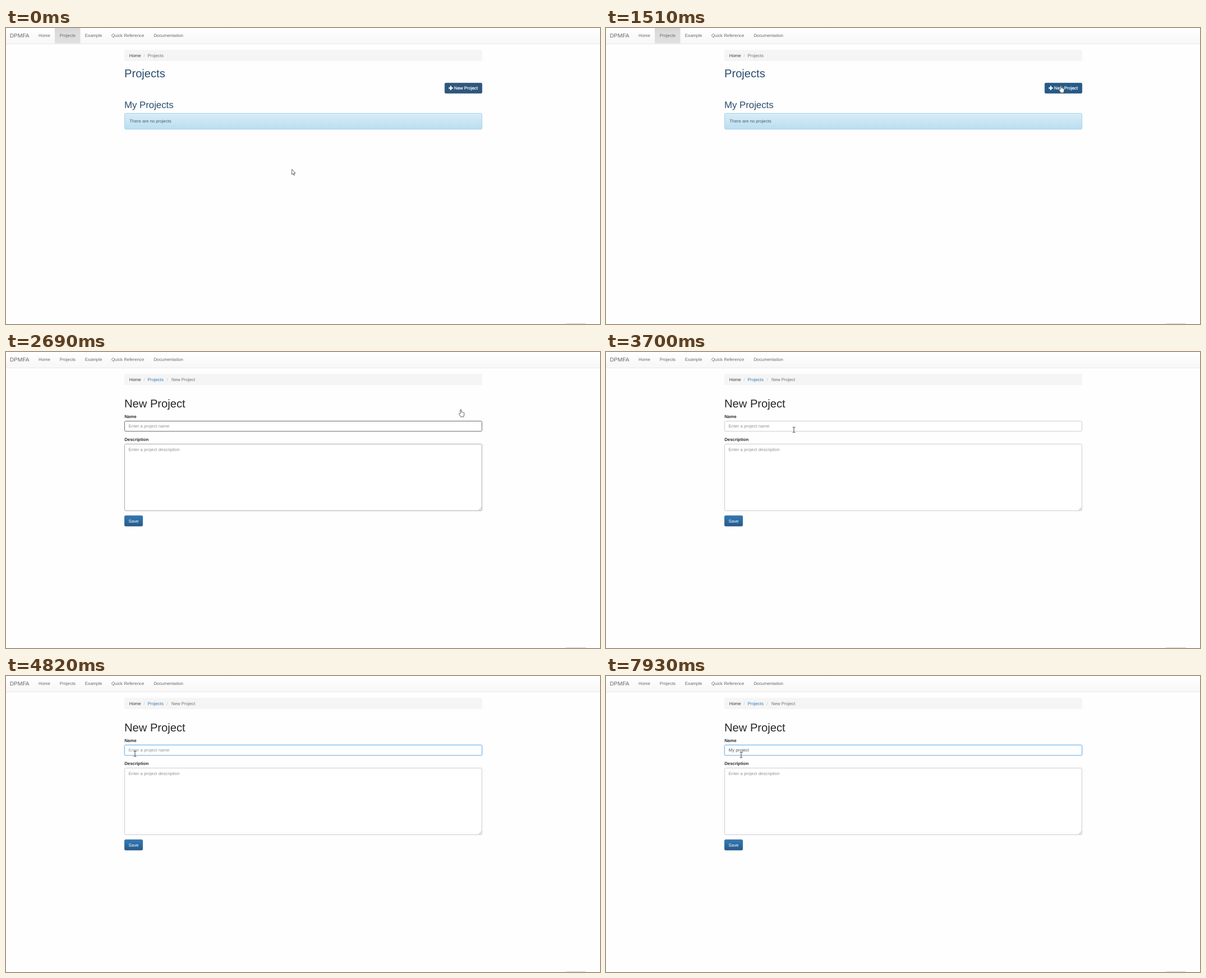
An HTML page for the animation above (8 s loop, 1059 px wide and 529 px high).

```html
<!DOCTYPE html>
<html lang="en">
<head>
<meta charset="utf-8">
<title>New project</title>
<style>
  html, body { margin: 0; width: 100%; height: 100%; overflow: hidden; background: #fefefe; }
  svg { display: block; width: 100%; height: 100%; }
  text { font: 7.83px "Liberation Sans", Arial, sans-serif; text-rendering: geometricPrecision; white-space: pre; }
  .nav { fill: #6a6a6a; }
  .brand { font-size: 10.07px; fill: #666; }
  .dark { fill: #3a3a3a; }
  .muted { fill: #707070; }
  .slash { fill: #c4c4c4; }
  .link { fill: #337ab7; }
  .h1 { font-size: 20.15px; }
  .h2 { font-size: 16.8px; }
  .blue { fill: #2a4b6c; }
  .black { fill: #262626; }
  .label { font-weight: bold; fill: #2b2b2b; }
  .hint { fill: #929292; }
  .white { fill: #fff; }
  .bold { stroke: #fff; stroke-width: .2; }
</style>
</head>
<body>
<svg viewBox="0 0 1059 529">
  <defs>
    <linearGradient id="bar" x2="0" y2="1"><stop stop-color="#fff"/><stop offset="1" stop-color="#f7f7f7"/></linearGradient>
    <linearGradient id="tab" x2="0" y2="1"><stop stop-color="#d6d6d6"/><stop offset=".3" stop-color="#dcdcdc"/><stop offset="1" stop-color="#e0e0e0"/></linearGradient>
    <linearGradient id="info" x2="0" y2="1"><stop stop-color="#d9edf7"/><stop offset="1" stop-color="#b9def0"/></linearGradient>
    <linearGradient id="primary" x2="0" y2="1"><stop stop-color="#337ab7"/><stop offset="1" stop-color="#265a88"/></linearGradient>
    <linearGradient id="pressed" x2="0" y2="1"><stop stop-color="#2e6da4"/><stop offset="1" stop-color="#265380"/></linearGradient>
  </defs>

  <rect width="1059" height="28" fill="url(#bar)"/>
  <rect y="28" width="1059" height="1" fill="#eaeaea"/>
  <rect id="activeTab" x="87" width="45.5" height="27.5" fill="url(#tab)"/>
  <text class="brand" x="6.8" y="17">DPMFA</text>
  <g class="nav">
    <text x="58" y="16.4">Home</text>
    <text x="95.7" y="16.4">Projects</text>
    <text x="140.8" y="16.4">Example</text>
    <text x="188" y="16.4">Quick Reference</text>
    <text x="263.2" y="16.4">Documentation</text>
  </g>

  <rect x="211" y="39" width="638" height="20" rx="2" fill="#f5f5f5"/>
  <text class="dark" x="219.8" y="52">Home</text>
  <text class="slash" x="245.6" y="52">/</text>

  <g id="listPage">
    <text class="muted" x="252.6" y="52">Projects</text>
    <text class="h1 blue" x="211" y="88.4">Projects</text>
    <rect id="newButton" x="782.3" y="98.3" width="66.4" height="18.4" rx="2" stroke="#244a70" stroke-width=".6"/>
    <path d="M789.2 107.3h7.6M793 103.5v7.6" stroke="#fff" stroke-width="2.2"/>
    <text class="white bold" x="799" y="110.2">New Project</text>
    <text class="h2 blue" x="211" y="143">My Projects</text>
    <rect x="211.5" y="152.5" width="637" height="28.4" rx="2" fill="url(#info)" stroke="#a3d3ec"/>
    <text x="220.3" y="169.4" fill="#44606f">There are no projects</text>
  </g>

  <g id="formPage">
    <text class="link" x="252.6" y="52">Projects</text>
    <text class="slash" x="286.2" y="52">/</text>
    <text class="muted" x="295" y="52">New Project</text>
    <text class="h1 black" x="211" y="99.4">New Project</text>
    <text class="label" x="211.2" y="117.6">Name</text>
    <rect id="glow" x="211" y="123" width="638" height="19" rx="2.5" fill="none" stroke="#66afe9" stroke-opacity=".3" stroke-width="2"/>
    <rect id="nameBox" x="211.5" y="123.5" width="637" height="18.2" rx="2" fill="#fff"/>
    <text id="nameText" x="218.6" y="135.4"></text>
    <rect id="caret" y="128" width=".7" height="9" fill="#333"/>
    <text class="label" x="211.2" y="158.8">Description</text>
    <rect id="descBox" x="211.5" y="164.5" width="637" height="119.2" rx="2" fill="#fff"/>
    <path d="M842.8 283l5-5M845.6 283l2.2-2.2" stroke="#888" stroke-width=".7"/>
    <text class="hint" x="218.6" y="176.8">Enter a project description</text>
    <rect x="211.3" y="292.6" width="32.4" height="18.6" rx="2" fill="url(#primary)" stroke="#245580" stroke-width=".6"/>
    <text class="white" x="218.6" y="304.6">Save</text>
  </g>

  <rect x="998" y="528" width="36" height="1" fill="#d3cccb"/>

  <g id="cursor" stroke-linejoin="round">
    <path id="arrow" d="M.2 0V9.4L2.3 7.5 3.8 10.8 5.2 10.2 3.7 7H6.5Z" fill="#fff" stroke="#333" stroke-width=".75"/>
    <path id="hand" d="M-.6 7.6V.9q1-1.5 2 0V5q1-.7 1.8.3 1-.5 1.7.4 1.4-.2 1.4 1.2V9.5L5.2 13.4H.4L-2.7 9q-.5-1.5.6-1.5Z" fill="#fff" stroke="#333" stroke-width=".8"/>
    <path id="beam" d="M-2.3-4.6H-.6L0-4.2.6-4.6H2.3M0-4.2V4.4M-2.3 4.8H-.6L0 4.4.6 4.8H2.3" fill="none" stroke="#333" stroke-width=".9"/>
  </g>
</svg>
<script>
const LOOP = 8000, STEP = 77;
const HOVER = 1360, PRESS = 2230, RELEASE = 2300, OPEN = 2690, FOCUS = 4300;
const BLINK = 540, INPUT_X = 218.6;
const NAME = "My project";
const keyTimes = [5830, 6070, 6220, 6450, 6610, 6690, 6760, 6910, 7080, 7230];

// Pointer waypoints: time, x, y
const path = [
  [0, 509.5, 252.5], [513, 509.5, 252.5], [1050, 713, 132], [1360, 810, 102.5],
  [1510, 810.5, 102.5], [3013, 810.5, 102.5], [3700, 335, 139], [3860, 275, 139],
  [4180, 250, 148], [4500, 237, 139], [4583, 237, 139], [4820, 230, 139],
  [7713, 230, 139], [7930, 241, 141], [LOOP, 241, 141]
];

const el = id => document.getElementById(id);
const set = (id, name, value) => el(id).setAttribute(name, value);
const show = (id, on) => set(id, "display", on ? "inline" : "none");
const grey = v => `rgb(${v},${v},${v})`;

function pointerAt(t) {
  const i = path.findIndex(p => p[0] > t);
  const [t0, x0, y0] = path[i - 1], [t1, x1, y1] = path[i];
  const steps = Math.max(1, Math.round((t1 - t0) / STEP));
  const u = Math.floor((t - t0) / (t1 - t0) * steps) / steps;
  return [x0 + (x1 - x0) * u, y0 + (y1 - y0) * u];
}

function pointerShape(t, y) {
  if (t < 1430 || (t >= RELEASE && t < OPEN)) return "arrow";
  if (t < 3090) return "hand";
  return y > 123 && y < 143 ? "beam" : "arrow";
}

function drawForm(t) {
  const settled = Math.min(1, Math.max(0, Math.floor((t - OPEN) / 80) / 2));
  const focused = t >= FOCUS;
  show("glow", focused);
  set("nameBox", "stroke", focused ? "#7dbcec" : grey(105 + 99 * settled));
  set("descBox", "stroke", grey(170 + 34 * settled));

  const count = keyTimes.filter(k => k <= t).length;
  const field = el("nameText");
  field.textContent = count ? NAME.slice(0, count) : "Enter a project name";
  field.setAttribute("fill", count ? "#555" : "#929292");

  const since = t - (count ? keyTimes[count - 1] : FOCUS);
  show("caret", focused && Math.floor(since / BLINK) % 2 === 0 && !(count === 0 && t >= 4820 && t < 5370));
  set("caret", "x", INPUT_X + (count ? field.getComputedTextLength() : 0));
}

function draw(t) {
  const open = t >= OPEN;
  show("listPage", !open);
  show("activeTab", !open);
  show("formPage", open);
  if (open) drawForm(t);
  else set("newButton", "fill",
    t < HOVER ? "#2f567d" : t < PRESS ? "#265a88" : t < RELEASE ? "#204d74" : "url(#pressed)");

  const [x, y] = pointerAt(t);
  const shape = pointerShape(t, y);
  set("cursor", "transform", `translate(${x} ${y})`);
  for (const id of ["arrow", "hand", "beam"]) show(id, id === shape);
}

let start;
function tick(now) {
  start ??= now;
  draw((now - start) % LOOP);
  requestAnimationFrame(tick);
}
draw(0);
requestAnimationFrame(tick);
</script>
</body>
</html>
```
